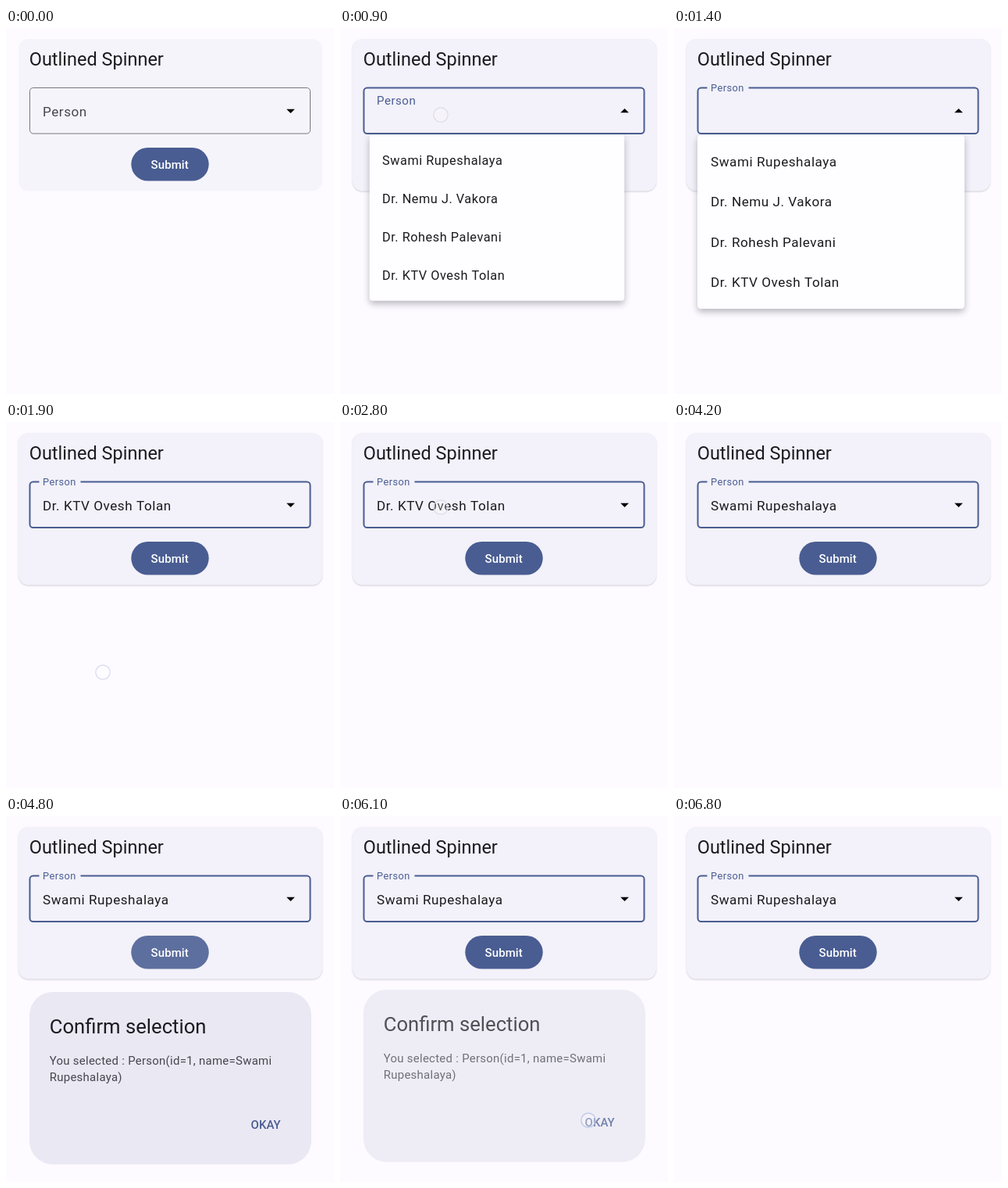
Animation of 420 by 468 pixels, one loop 6.9 s. Source, as an HTML page with a canvas:

```html
<!DOCTYPE html>
<html lang="en">
<head>
<meta charset="utf-8">
<title>Outlined Spinner</title>
<style>
html, body { margin: 0; width: 100%; height: 100%; overflow: hidden; background: #fdfbff; }
canvas { display: block; width: 420px; height: 468px; }
</style>
</head>
<body>
<canvas id="stage"></canvas>
<script>
const W = 420, H = 468, LOOP = 6900, STEP = 100;
const DP = 420 / 392.7;
const INK = '#1b1b1f', PRIMARY = '#495d92', BG = '#fdfbff';
const PEOPLE = ['Swami Rupeshalaya', 'Dr. Nemu J. Vakora', 'Dr. Rohesh Palevani', 'Dr. KTV Ovesh Tolan'];

// Menu sessions: opening time, closing time, chosen item
const MENUS = [
  { open: 850, close: 1780, pick: 3 },
  { open: 2860, close: 3860, pick: 0 }
];
// Touches: start, end, position
const TAPS = [
  { from: 700, to: 950, x: 129, y: 111, ink: '#dddbe9' },
  { from: 1600, to: 1950, x: 124, y: 320, ink: '#d8d8f0' },
  { from: 2700, to: 2950, x: 129, y: 109, ink: '#dddbe9' },
  { from: 3680, to: 3960, x: 122, y: 172, ink: '#d8d8f0' },
  { from: 4500, to: 4750, x: 210, y: 175, ink: '#a9b5dc' },
  { from: 5900, to: 6150, x: 318, y: 389, ink: '#bdc6e6' }
];
const SUBMIT = 4640, DIALOG_IN = 4710, DIALOG_OUT = 6050;

const canvas = document.getElementById('stage');
const dpr = window.devicePixelRatio || 1;
canvas.width = W * dpr;
canvas.height = H * dpr;
const ctx = canvas.getContext('2d');

const clamp = v => Math.min(1, Math.max(0, v));
const seg = (t, a, b) => clamp((t - a) / (b - a));
const mix = (a, b, p) => a + (b - a) * p;

// Cubic bezier easing, solved by bisection
function bezier(x1, y1, x2, y2) {
  const at = (a, b, s) => 3 * a * s * (1 - s) ** 2 + 3 * b * s * s * (1 - s) + s ** 3;
  return x => {
    let lo = 0, hi = 1;
    for (let i = 0; i < 20; i++) {
      const m = (lo + hi) / 2;
      if (at(x1, x2, m) < x) lo = m; else hi = m;
    }
    return at(y1, y2, lo);
  };
}
const standard = bezier(0.4, 0, 0.2, 1);
const decelerate = bezier(0, 0, 0.2, 1);

function text(str, x, y, size, color, spacing = 0, weight = 400) {
  ctx.font = `${weight} ${size}px Roboto, sans-serif`;
  ctx.letterSpacing = `${spacing}px`;
  ctx.fillStyle = color;
  ctx.fillText(str, x, y);
}

function box(x, y, w, h, r, fill) {
  ctx.beginPath();
  ctx.roundRect(x, y, w, h, r);
  ctx.fillStyle = fill;
  ctx.fill();
}

function shadow(color, blur, dy) {
  ctx.shadowColor = color;
  ctx.shadowBlur = blur * dpr;
  ctx.shadowOffsetY = dy * dpr;
}

function drawCard(t) {
  ctx.save();
  if (t >= STEP) shadow('rgba(40,40,60,.2)', 2, 1);
  box(16, 14, 389, 194.5, 13, t < STEP ? '#f6f4fb' : '#f3f1f9');
  ctx.restore();
  text('Outlined Spinner', 29.7, 48, 22 * DP, INK);
}

function drawField(t, menu, value) {
  const focused = t >= MENUS[0].open;
  const p = standard(seg(t, MENUS[0].open, MENUS[0].open + 150));
  const x = 30.5, y = 76.5, w = 359, h = 58.5;

  ctx.save();
  const gap = 53 * clamp(p * 2 - 1);
  if (gap) {
    ctx.beginPath();
    ctx.rect(0, 0, W, H);
    ctx.rect(69 - gap / 2, 70, gap, 14);
    ctx.clip('evenodd');
  }
  ctx.beginPath();
  ctx.roundRect(x, y, w, h, 4 * DP);
  ctx.lineWidth = focused ? 2 : 1;
  ctx.strokeStyle = focused ? PRIMARY : '#777680';
  ctx.stroke();
  ctx.restore();

  const label = p === 0 ? '#46464f' : PRIMARY;
  text('Person', 47, mix(113, 81, p), mix(16, 12, p) * DP, label, mix(0.5, 0.4, p) * DP);
  if (value) text(value, 47, 113, 16 * DP, INK, 0.5 * DP);

  const dir = menu ? -1 : 1, half = 5 * DP;
  ctx.beginPath();
  ctx.moveTo(364.5 - half, 106 - 2.2 * dir);
  ctx.lineTo(364.5 + half, 106 - 2.2 * dir);
  ctx.lineTo(364.5, 106 + 3.1 * dir);
  ctx.fillStyle = '#000';
  ctx.fill();
}

function drawButton(t) {
  box(160.3, 153, 99.4, 42.5, 21.3, PRIMARY);
  const glow = seg(t, SUBMIT - 120, SUBMIT) * (1 - seg(t, SUBMIT + 200, SUBMIT + 340));
  if (glow) box(160.3, 153, 99.4, 42.5, 21.3, `rgba(255,255,255,${0.11 * glow})`);
  text('Submit', 185.6, 180.4, 14 * DP, '#fff', 0.1 * DP, 500);
}

function drawMenu(t, { open, close, pick }) {
  const alpha = seg(t, open, open + 30) * (1 - seg(t, close, close + 75));
  if (!alpha) return;
  const scale = mix(0.8, 1, decelerate(seg(t, open, open + 120)));
  const row = 48 * DP, pad = 8 * DP, h = row * 4 + pad * 2;

  ctx.save();
  ctx.globalAlpha = alpha;
  ctx.translate(201, 136.5);
  ctx.scale(scale, scale);
  ctx.translate(-171, 0);
  ctx.save();
  shadow('rgba(30,30,45,.3)', 9, 4);
  box(0, 0, 342, h, 4 * DP, '#fefdff');
  ctx.restore();
  const press = seg(t, close - 140, close - 60);
  if (press) {
    ctx.fillStyle = `rgba(27,27,31,${0.08 * press})`;
    ctx.fillRect(0, pad + row * pick, 342, row);
  }
  PEOPLE.forEach((name, i) =>
    text(name, 17, pad + row * (i + 0.5) + 6.2, 16 * DP, INK, 0.5 * DP));
  ctx.restore();
}

function drawDialog(t) {
  const alpha = seg(t, DIALOG_IN, DIALOG_IN + 80) * (1 - seg(t, DIALOG_OUT, DIALOG_OUT + 200));
  if (!alpha) return;
  const [first, last] = PEOPLE[0].split(' ');
  const size = 14 * DP, spacing = 0.25 * DP, soft = '#46464f';

  ctx.save();
  ctx.globalAlpha = alpha;
  ctx.translate(0, 3 * (1 - seg(t, 4800, 4900)));
  box(30, 222, 361, 220.5, 28 * DP, '#eae8f3');
  text('Confirm selection', 55.7, 274.8, 24 * DP, INK);
  text(`You selected : Person(id=1, name=${first}`, 55.7, 315, size, soft, spacing);
  text(`${last})`, 55.7, 336.4, size, soft, spacing);
  text('OKAY', 313.5, 397.3, size, PRIMARY, 0.1 * DP, 500);
  ctx.restore();
}

function drawTap({ x, y, ink }) {
  ctx.beginPath();
  ctx.arc(x, y, 9.2, 0, Math.PI * 2);
  ctx.fillStyle = 'rgba(255,255,255,.25)';
  ctx.fill();
  ctx.lineWidth = 1.2;
  ctx.strokeStyle = ink;
  ctx.stroke();
}

function draw(t) {
  ctx.setTransform(dpr, 0, 0, dpr, 0, 0);
  ctx.fillStyle = BG;
  ctx.fillRect(0, 0, W, H);

  const menu = MENUS.find(m => t >= m.open && t < m.close);
  const done = MENUS.filter(m => t >= m.close).pop();

  drawCard(t);
  drawField(t, menu, done && PEOPLE[done.pick]);
  drawButton(t);
  MENUS.forEach(m => drawMenu(t, m));
  drawDialog(t);
  TAPS.filter(p => t >= p.from && t < p.to).forEach(drawTap);
}

function tick(now) {
  draw(Math.floor((now - start) % LOOP / STEP) * STEP);
  requestAnimationFrame(tick);
}
const start = performance.now();
draw(0);
requestAnimationFrame(now => tick(Math.max(now, start)));
</script>
</body>
</html>
```
